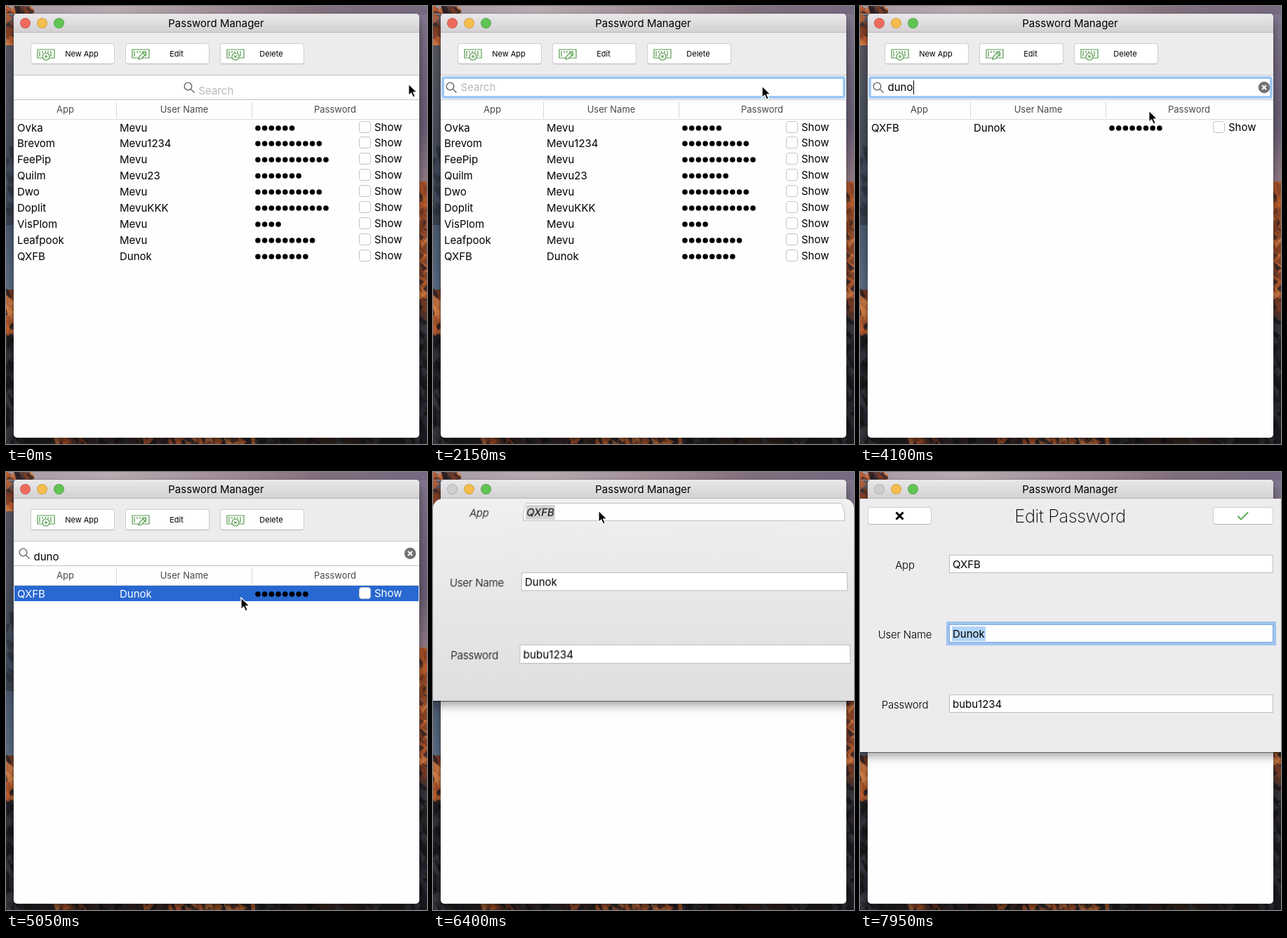
These frames come from a looping animation (600x624 px, 8 s). An HTML page with a canvas:

```html
<!DOCTYPE html>
<html lang="en">
<head>
<meta charset="utf-8">
<title>Password Manager</title>
<style>
html, body { margin: 0; width: 100%; height: 100%; overflow: hidden; }
#stage { position: relative; width: 600px; height: 624px; overflow: hidden; font: 15px/20px Inter, Roboto, sans-serif; color: #000; }
#stage div, #stage svg, #stage canvas { position: absolute; box-sizing: border-box; }
.t { white-space: pre; }
.mid { transform: translateX(-50%); }
#window { left: 11px; top: 11px; width: 578px; height: 604px; border-radius: 5px; background: #fefefe; box-shadow: 0 0 0 .5px #5558, 0 9px 14px #0007; overflow: hidden; }
#title { left: 0; top: 0; width: 578px; height: 27px; background: linear-gradient(#eae8ea, #d3d1d4); border-bottom: 1px solid #b9b7ba; }
#tools { left: 0; top: 27px; width: 578px; height: 60px; background: #ecebed; }
#search { left: 0; top: 87px; width: 578px; height: 36px; background: #fff; border: solid #c4c3c5; border-width: 1px 0; }
#head { left: 0; top: 123px; width: 578px; height: 28px; border-bottom: 1px solid #dadada; }
.light { width: 15px; height: 15px; top: 17px; border-radius: 50%; border: 1px solid #0002; }
.button { background: #fff; border: 1px solid #cfced0; border-bottom-color: #b4b3b5; border-radius: 4px; }
.small { font-size: 11px; }
.header { font-size: 13px; color: #4a4a4a; }
.rule { width: 1px; height: 24px; top: 136px; background: #d9d9d9; }
.row { left: 12px; width: 576px; height: 22px; }
.row.on { background: #2768d1; color: #fff; }
.box { left: 491px; top: 2px; width: 17px; height: 17px; border: 1px solid #c3c3c3; border-radius: 4px; background: #fff; }
#ring { left: 1px; top: 89px; width: 576px; height: 32px; border-radius: 4px; box-shadow: inset 0 0 0 4px #a1c8f5, 0 0 0 var(--spread) #a1c8f5; }
#caret { width: 1px; height: 20px; top: 106px; background: #000; }
#clip { left: 0; top: 38px; width: 600px; height: 586px; overflow: hidden; }
#sheet { left: -20px; top: 0; width: 640px; height: 361px; border: solid transparent; border-width: 0 20px; background: #ecebed border-box; transform-origin: 320px 147px; box-shadow: 0 1px 1px #0006, 0 5px 14px #0006; }
.field { left: 127px; width: 462px; height: 26px; background: #fff; border: 1px solid #bdbcbe; }
.field.focus { box-shadow: 0 0 0 4px #9ec3ee; border-color: #7fa9dc; }
.field span { position: absolute; left: 3px; top: 2px; padding: 0 1px; line-height: 21px; }
.label { font-weight: 300; letter-spacing: -.2px; left: 64px; }
</style>
</head>
<body>
<div id="stage">
  <canvas id="wall" width="600" height="624"></canvas>
  <div id="window">
    <div id="title"></div><div id="tools"></div><div id="search"></div><div id="head"></div><div id="ring"></div>
  </div>
  <div id="chrome"></div>
  <svg id="lens" width="18" height="18" style="left:0;top:108px" fill="none" stroke="#5c5c5e" stroke-width="1.3"><circle cx="6.5" cy="6.5" r="5.3"/><path d="M10.4 10.4 15.5 15.5"/></svg>
  <div id="query" class="t"></div>
  <div id="caret"></div>
  <svg id="clear" width="18" height="18" style="left:567px;top:107px"><circle cx="9" cy="9" r="8.3" fill="#737375"/><path d="M6 6l6 6M12 6l-6 6" stroke="#fff" stroke-width="1.8"/></svg>
  <div id="list"></div>
  <div id="clip"><div id="sheet"></div></div>
  <svg id="pointer" width="20" height="26" style="left:-2px;top:-2px"><path d="M2 2v16.5l3.8-3.5 2.6 6 3-1.3-2.6-5.8h5.2z" stroke="#fff" stroke-width="1.3"/></svg>
</div>
<script>
const LOOP = 8000;
const $ = id => document.getElementById(id);
const add = (parent, html) => { parent.insertAdjacentHTML('beforeend', html); return parent.lastElementChild; };
const text = (parent, x, y, s, cls = '') =>
  add(parent, `<div class="t ${cls}" style="left:${x}px;top:${y - 10}px">${s}</div>`);
const box = (parent, cls, x, y, w, h) =>
  add(parent, `<div class="${cls}" style="left:${x}px;top:${y}px;width:${w}px;height:${h}px"></div>`);
const show = (el, on) => { el.style.visibility = on ? 'visible' : 'hidden'; };

// Mountain wallpaper, seen only around the window
function paintWall() {
  const c = $('wall').getContext('2d');
  let seed = 11;
  const rnd = () => (seed = (seed * 16807) % 2147483647) / 2147483647;
  const fade = (x, y, w, h, colors) => {
    const g = w > h ? c.createLinearGradient(x, 0, x + w, 0) : c.createLinearGradient(0, y, 0, y + h);
    colors.forEach((k, i) => g.addColorStop(i / (colors.length - 1), k));
    c.fillStyle = g;
    c.fillRect(x, y, w, h);
  };
  const rocks = (x, y, w, h, n, colors) => {
    c.save();
    c.globalAlpha = .75;
    c.beginPath(); c.rect(x, y, w, h); c.clip();
    for (let i = 0; i < n; i++) {
      const px = x + rnd() * w, py = y + rnd() * h;
      c.fillStyle = colors[Math.floor(rnd() * colors.length)];
      c.beginPath();
      c.moveTo(px - 6, py - 4 - rnd() * 8);
      c.lineTo(px + 4 + rnd() * 6, py + rnd() * 6);
      c.lineTo(px - 5 + rnd() * 6, py + 6 + rnd() * 10);
      c.fill();
    }
    c.restore();
  };
  const warm = ['#c4622f', '#8a4226', '#2a2025', '#d98148', '#4a2d28'];
  const dark = ['#15151a', '#2b2a31', '#3a383f', '#1d1c22'];
  fade(0, 0, 600, 20, ['#a79ba5', '#b9abb2', '#a18f98', '#816f7d', '#756a82']);
  fade(0, 12, 20, 300, ['#5b5963', '#515561', '#454b59', '#394150']);
  fade(0, 312, 20, 92, ['#4c5b72', '#5d6e86']);
  fade(0, 404, 20, 220, ['#6d3a27', '#28242a', '#1a1a1f', '#1a1a1f']);
  fade(580, 12, 20, 240, ['#83788f', '#73667e', '#695d75', '#957d88']);
  fade(580, 250, 20, 374, ['#b25a2e', '#8a4729', '#28242b', '#1b1a20']);
  fade(0, 610, 600, 14, ['#1c1b20', '#3c2a28', '#20191c', '#38271f', '#1b1a20']);
  rocks(0, 0, 40, 11, 22, warm);
  rocks(0, 11, 12, 45, 16, warm);
  rocks(0, 200, 12, 105, 14, ['#2d3442', '#465064']);
  rocks(0, 402, 12, 68, 24, warm);
  rocks(0, 470, 12, 154, 40, dark);
  rocks(588, 250, 12, 185, 60, warm);
  rocks(588, 440, 12, 184, 45, dark);
  rocks(0, 614, 600, 10, 70, dark);
  rocks(65, 614, 50, 10, 16, warm);
  rocks(185, 614, 170, 10, 40, warm);
}

// Window furniture
const chrome = $('chrome');
const lights = ['#ee6a5e', '#f5bd4f', '#61c454'].map((color, i) => {
  const dot = box(chrome, 'light', 20 + 24 * i, 17, 15, 15);
  dot.style.background = color;
  return dot;
});
text(chrome, 299.5, 25, 'Password Manager', 'mid');
const badges = [
  '<circle cx="13" cy="12" r="5"/><path d="M13 9.5v5M10.5 12h5"/>',
  '<path d="M10 16l1-4 7-7 3 3-7 7zM16 7l3 3"/>',
  '<circle cx="13" cy="12" r="5"/><path d="M11.3 10.3l3.4 3.4M14.7 10.3l-3.4 3.4"/>'
];
['New App', 'Edit', 'Delete'].forEach((name, i) => {
  const x = 35 + 135 * i;
  box(chrome, 'button', x, 53, 120, 30);
  text(chrome, x + 73, 68, name, 'small mid');
  add(chrome, `<svg width="28" height="20" style="left:${x + 9}px;top:60px" fill="#fff" stroke="#559a4c" stroke-width="1.2">
    <path d="M1 2h24v12H1zM4 4v8M8 4v3M12 4v3M16 4v3M20 4v8"/>${badges[i]}</svg>`);
});
[[84.5, 'App'], [254, 'User Name'], [469, 'Password']].forEach(([x, s]) => text(chrome, x, 147, s, 'header mid'));
[157, 350].forEach(x => box(chrome, 'rule', x, 136, 1, 24));

// Accounts: app, user, password length
const accounts = [
  ['Ovka', 'Mevu', 6], ['Brevom', 'Mevu1234', 10], ['FeePip', 'Mevu', 11],
  ['Quilm', 'Mevu23', 7], ['Dwo', 'Mevu', 10], ['Doplit', 'MevuKKK', 11],
  ['VisPlom', 'Mevu', 4], ['Leafpook', 'Mevu', 9], ['QXFB', 'Dunok', 8]
].map(([app, user, length]) => {
  const row = add($('list'), '<div class="row"></div>');
  text(row, 4, 12, app);
  text(row, 150, 12, user);
  const dots = Array.from({ length }, (_, i) => `<circle cx="${347 + 9.7 * i}" cy="12" r="3.8"/>`).join('');
  add(row, `<svg width="480" height="22" style="left:0;top:0">${dots}</svg>`);
  add(row, '<div class="box"></div>');
  text(row, 513, 11, 'Show');
  return { row, key: (app + ' ' + user).toLowerCase() };
});

// Edit sheet
const sheet = $('sheet');
box(sheet, 'button', 11, 12, 91, 25);
box(sheet, 'button', 503, 12, 86, 25);
add(sheet, '<svg width="14" height="14" style="left:50px;top:18px" stroke="#000" stroke-width="3"><path d="M1.5 1.5l10 10M11.5 1.5l-10 10"/></svg>');
add(sheet, '<svg width="18" height="14" style="left:537px;top:18px" fill="none" stroke="#4fa64b" stroke-width="1.8"><path d="M1.5 7l4.5 4.5L16 1.5"/></svg>');
text(sheet, 299.5, 25, 'Edit Password', 'mid').style.cssText += 'font-size:25.5px;font-weight:200;letter-spacing:-.4px';
const fields = [['App', 'QXFB', 80], ['User Name', 'Dunok', 179], ['Password', 'bubu1234', 279]].map(([name, value, y]) => {
  const label = text(sheet, 64, y + 15, name, 'label mid');
  const field = add(sheet, `<div class="field" style="top:${y}px"><span>${value}</span></div>`);
  return { label, field, value: field.firstChild };
});

// Timing
const pointerPath = [[0, 574, 111], [450, 469, 114], [3780, 469, 114], [4100, 412, 149], [4500, 335, 179], [5100, 335, 179], [5700, 236, 55], [LOOP, 236, 55]];
const sheetPath = [[0, 375], [6100, 375], [6250, 255], [6400, 75], [6480, 25], [6560, 0], [LOOP, 0]];
const keys = [2700, 3000, 3350, 3700];
const typed = 'duno';
const SLIDE = 600, GLOW = 790, FOCUS = 915, SELECT = 4700, SHEET = 6100, OPEN = 6560, TAB = 7500;

const along = (path, t) => {
  const i = path.findIndex((p, n) => n && t <= p[0]);
  const a = path[i - 1], b = path[i], k = (t - a[0]) / (b[0] - a[0]);
  return a.slice(1).map((v, n) => v + (b[n + 1] - v) * k);
};
const clamp = k => Math.min(1, Math.max(0, k));
const ease = k => (k < .5 ? 2 * k * k : 1 - 2 * (1 - k) ** 2);

function drawSearch(t) {
  const focused = t >= FOCUS && t < SELECT;
  const count = keys.filter(k => t >= k).length;
  const left = 235 * (1 - ease(clamp((t - SLIDE) / (FOCUS - SLIDE))));
  const query = $('query');
  const value = typed.slice(0, count);
  $('lens').style.transform = `translateX(${18 + left}px)`;
  if (query.textContent !== (value || 'Search')) query.textContent = value || 'Search';
  query.style.color = count ? '#000' : '#b9b9bb';
  query.style.left = 39.5 + left + 'px';
  query.style.top = (focused ? 106 : 111) + 'px';

  // The focus ring closes in on the field
  const glow = clamp((t - GLOW) / 210);
  const ring = $('ring');
  show(ring, t >= GLOW && t < SELECT);
  ring.style.opacity = glow ** 2;
  ring.style.setProperty('--spread', 38 * (1 - glow) + 'px');

  show($('clear'), count);
  const since = t - (count ? keys[count - 1] : 650);
  show($('caret'), focused && Math.floor(since / 500) % 2 === 0);
  $('caret').style.left = 40 + (count ? query.offsetWidth : 0) + 'px';

  let line = 0;
  for (const { row, key } of accounts) {
    const match = key.includes(value);
    show(row, match);
    row.classList.toggle('on', match && t >= SELECT);
    if (match) row.style.top = 161.5 + 22.9 * line++ + 'px';
  }
}

function drawSheet(t) {
  const [offset] = along(sheetPath, t);
  const moving = t < OPEN;
  const tilt = Math.min(1, offset / 75);
  show($('clip'), t >= SHEET);
  $('clip').style.borderRadius = moving ? '14px 14px 0 0' : '0';
  sheet.style.height = 361 - 6 * tilt + 'px';
  sheet.style.transform = moving
    ? `translateY(${-offset}px) perspective(1000px) rotateX(${8 * tilt}deg) scaleY(${1 + .015 * tilt})` : 'none';
  sheet.style.backgroundImage = moving ? 'linear-gradient(#f1f0f1 20%, #dfdee0)' : 'none';
  lights[0].style.background = t >= SHEET ? '#cfcdd0' : '#ee6a5e';
  const active = t < TAB ? 0 : 1;
  fields.forEach(({ label, field, value }, i) => {
    field.classList.toggle('focus', !moving && i === active);
    value.style.background = i !== active ? 'none' : moving ? '#d3d3d4' : '#b4d5fb';
    const bent = moving && i === 0;
    label.style.fontStyle = value.style.fontStyle = bent ? 'italic' : 'normal';
    field.style.borderRadius = bent ? '5px 6px 0 0 / 22px 22px 0 0' : '0';
  });
}

const start = performance.now();
function draw(now) {
  const t = Math.max(0, now - start) % LOOP;
  drawSearch(t);
  drawSheet(t);
  const [x, y] = along(pointerPath, t);
  $('pointer').style.transform = `translate(${x}px, ${y}px)`;
  show($('pointer'), t < TAB);
  requestAnimationFrame(draw);
}

paintWall();
draw(start);
</script>
</body>
</html>
```
